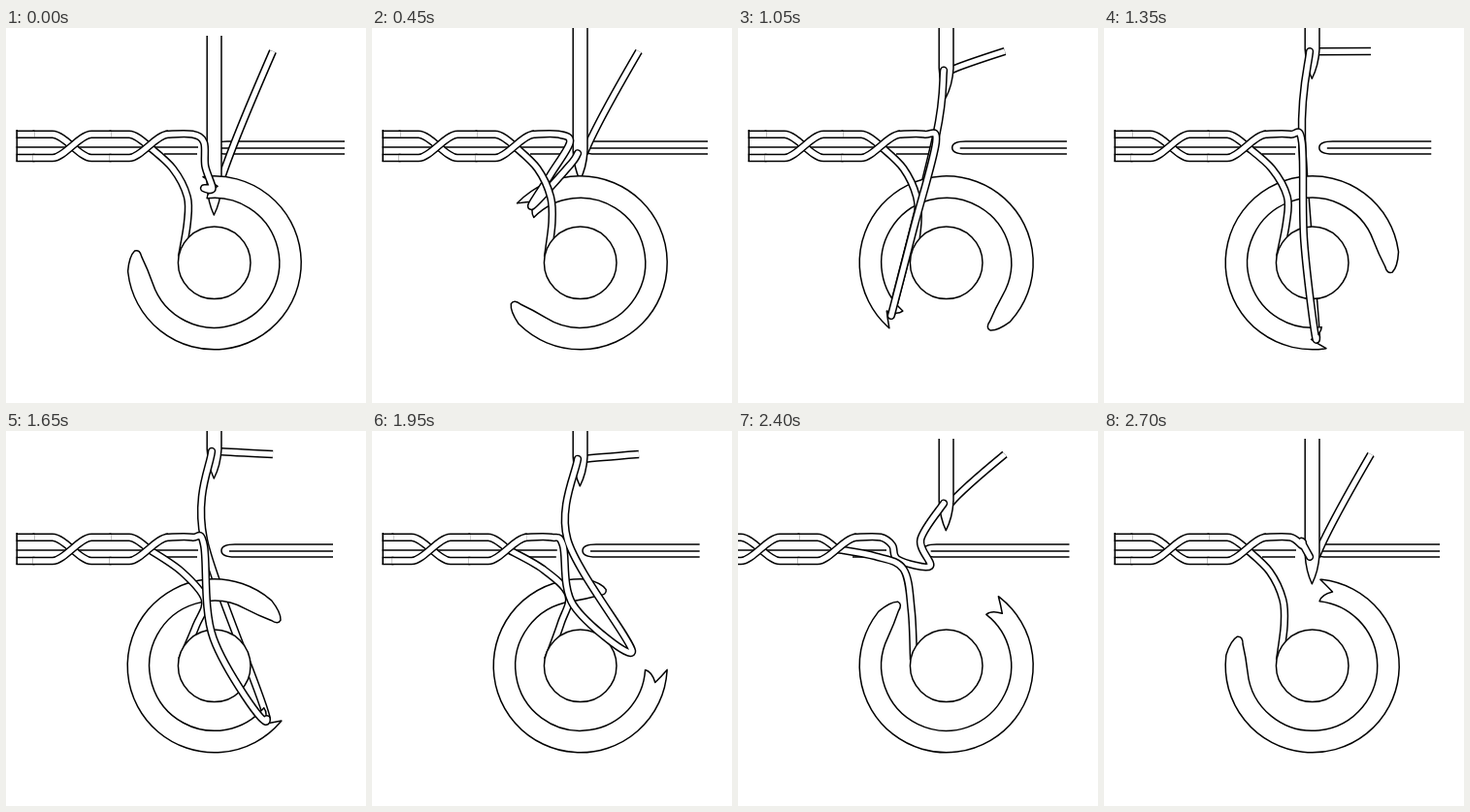
Animation, 371 px wide and 387 px high, one loop 2850 ms. Source, as an HTML page with a canvas:

```html
<!DOCTYPE html>
<html lang="en">
<head>
<meta charset="utf-8">
<title>Lockstitch</title>
<style>
html, body { margin: 0; width: 100%; height: 100%; overflow: hidden; background: #fff; }
canvas { display: block; }
</style>
</head>
<body>
<canvas id="stage" width="371" height="387"></canvas>
<script>
const ctx = document.getElementById('stage').getContext('2d');
const STEP = 150, COUNT = 19;
const CX = 214.7, CY = 242.3, OUTER = 89.5, INNER = 67;
const LINE = 1.5, TUBE = 8.4;
const PITCH = 79, LAST = 147, HIGH = 109.7, LOW = 134;
const HIGHEST = 11, RELEASED = 17;

const rad = deg => deg * Math.PI / 180;
const wave = (i, turns, shift) => Math.cos(2 * Math.PI * turns * (i + shift) / COUNT);
const polar = (r, deg) => [CX + r * Math.cos(rad(deg)), CY - r * Math.sin(rad(deg))];
const between = (p, q, dx = 0, dy = 0) => [(p[0] + q[0]) / 2 + dx, (p[1] + q[1]) / 2 + dy];

// needle depth: 1 at the bottom, 0 at the top
const depth = i => i < HIGHEST
  ? Math.cos(Math.PI / 2 * i / HIGHEST) ** 3
  : ((i - HIGHEST) / (COUNT - HIGHEST)) ** 2.1;

// one uneven turn of the hook per stitch
const hookAngle = i => 97 + 360 * i / COUNT - 16 * wave(i, 1, -3.5) + 5 * wave(i, 2, 1);

// the fabric moves faster and faster until the stitch is closed
const feedAt = i => i > HIGHEST && i < RELEASED ? -1.8 * (i - HIGHEST) ** 2 : 0;

// the loop rides on the hook, then slips off and is pulled up
function loopTip(i, feed) {
  const from = polar(77, hookAngle(Math.min(i, HIGHEST)) - 3);
  const u = Math.min(1, Math.max(0, (i - HIGHEST) / (RELEASED - HIGHEST)));
  const bend = [285, 185], to = [205 + feed, 115];
  return from.map((v, k) => v * (1 - u) ** 2 + 2 * u * (1 - u) * bend[k] + u * u * to[k]);
}

// needle thread: last stitch, loop tip (index 4), needle eye
function loopPoints(feed, tip, eye) {
  const end = [204 + feed, 118];
  const pull = Math.max(0, tip[0] - end[0]);
  const hole = [204 + 0.35 * feed, Math.max(112, Math.min(eye[1] + 12, tip[1]))];
  return [
    [166 + feed, HIGH], [192 + feed, HIGH], end,
    between(end, tip, -0.35 * pull, 0.1 * pull),
    tip, hole, eye
  ];
}

function bobbinPoints(feed, tip) {
  const start = [LAST + feed, 122], end = [181, 236];
  const knot = [184 + 0.32 * Math.max(0, tip[0] - 204) + 0.3 * feed, 174 + 0.7 * feed];
  return [start, between(start, knot, 5, -3), knot, between(knot, end, 3, -4), end];
}

function outline(path) {
  ctx.lineWidth = LINE;
  ctx.strokeStyle = '#000';
  ctx.fillStyle = '#fff';
  ctx.fill(path);
  ctx.stroke(path);
}

function rule(x1, x2, y) {
  ctx.fillStyle = '#000';
  ctx.fillRect(x1, y - LINE / 2, x2 - x1, LINE);
}

function tube(path, cap = 'butt') {
  ctx.lineCap = cap;
  ctx.lineJoin = 'round';
  ctx.strokeStyle = '#000';
  ctx.lineWidth = TUBE;
  ctx.stroke(path);
  ctx.strokeStyle = '#fff';
  ctx.lineWidth = TUBE - 2 * LINE;
  ctx.stroke(path);
  ctx.lineCap = 'butt';
}

// smooth curve through points, limited to the part from index a to b
function curve(pts, a = 0, b = pts.length - 1) {
  const path = new Path2D();
  const at = k => pts[Math.max(0, Math.min(pts.length - 1, k))];
  path.moveTo(...at(a));
  for (let k = a; k < b; k++) {
    const [p, q, r, s] = [at(k - 1), at(k), at(k + 1), at(k + 2)];
    path.bezierCurveTo(
      q[0] + (r[0] - p[0]) / 6, q[1] + (r[1] - p[1]) / 6,
      r[0] - (s[0] - q[0]) / 6, r[1] - (s[1] - q[1]) / 6, ...r);
  }
  return path;
}

// one of the two threads through every twist, from height y1 to y2
function crossings(feed, y1, y2) {
  const path = new Path2D(), half = PITCH / 2 + 1;
  for (let k = 0; k < 3; k++) {
    const x = LAST + feed - k * PITCH;
    path.moveTo(x - half, y1);
    path.lineTo(x - 20, y1);
    path.bezierCurveTo(x - 8, y1, x + 8, y2, x + 20, y2);
    if (k) path.lineTo(x + half, y2);
  }
  return path;
}

function clipped(left, right, draw) {
  ctx.save();
  ctx.beginPath();
  ctx.rect(left, 0, right - left, 387);
  ctx.clip();
  draw();
  ctx.restore();
}

function layer(x, end) {
  const path = new Path2D();
  path.moveTo(end, 117);
  path.lineTo(x + 14, 117);
  path.bezierCurveTo(x + 4, 117, x, 120, x, 123.5);
  path.bezierCurveTo(x, 127, x + 4, 130, x + 14, 130);
  path.lineTo(end, 130);
  outline(path);
  rule(x + 8, end, 124);
}

function supply(eye) {
  const path = new Path2D();
  path.moveTo(275, 24);
  path.quadraticCurveTo(229, 24 + 0.75 * (eye[1] - 24), 219, eye[1]);
  tube(path);
}

function needle(tip, top) {
  const l = 207.2, r = 222, m = 214.3;
  const path = new Path2D();
  path.moveTo(l, top);
  path.lineTo(l, tip - 30);
  path.quadraticCurveTo(l + 1, tip - 13, m, tip);
  path.quadraticCurveTo(r - 1, tip - 13, r, tip - 30);
  path.lineTo(r, top);
  outline(path);
}

// a ring with a forked point at one end and a rounded tail at the other
function hook(pt) {
  const tail = pt + 77 - 360, path = new Path2D();
  const bend = (r1, a1, r2, a2) => path.quadraticCurveTo(...polar(r1, a1), ...polar(r2, a2));
  path.moveTo(...polar(OUTER, pt + 3));
  path.arc(CX, CY, OUTER, -rad(pt + 2), -rad(tail + 14));
  bend(88, tail + 4, 83, tail);
  bend(78, tail - 2, 75, tail + 4);
  bend(69, tail + 14, INNER, tail + 27);
  path.arc(CX, CY, INNER, -rad(tail + 27), -rad(pt + 2), true);
  bend(74, pt + 1, 79, pt - 7);
  bend(84, pt - 2, OUTER, pt + 3);
  path.closePath();
  outline(path);
}

function bobbin() {
  const path = new Path2D();
  path.arc(CX, CY, 37.3, 0, 2 * Math.PI);
  outline(path);
}

function draw(i) {
  const down = depth(i), tip = 49 + 144 * down, eye = [212, tip - 28];
  const feed = feedAt(i), catchPoint = loopTip(i, feed);
  const loop = loopPoints(feed, catchPoint, eye);
  const cutEdge = i < 14 || i >= RELEASED;
  const left = cutEdge ? 10.5 : 0;
  const around = i > 4 && i < 13;
  const inFront = i > 6 && i < 15;
  const drawLoop = () => tube(curve(loop, 0, around ? 4 : 6), 'round');

  ctx.fillStyle = '#fff';
  ctx.fillRect(0, 0, 371, 387);
  layer(222 + 0.63 * feed - 8 * down, 337 + 12 * down);
  rule(left, LAST + feed + 51, 123);
  rule(LAST + feed + 16, LAST + feed + 50, 130);
  clipped(left, LAST + feed, () => tube(crossings(feed, HIGH, LOW)));
  supply(eye);
  needle(tip, i > 0 && i < 14 ? 0 : 8);
  if (around) tube(curve(loop, 4, 6), 'round');
  hook(hookAngle(i));
  if (!inFront) drawLoop();
  tube(curve(bobbinPoints(feed, catchPoint)));
  bobbin();
  if (inFront) drawLoop();
  clipped(left, 371, () => tube(crossings(feed, LOW, HIGH)));
  if (cutEdge) {
    ctx.fillStyle = '#000';
    ctx.fillRect(10.5, 105, LINE, 33);
  }
}

const start = performance.now();
function tick() {
  draw(Math.floor((performance.now() - start) / STEP) % COUNT);
  requestAnimationFrame(tick);
}
tick();
</script>
</body>
</html>
```
